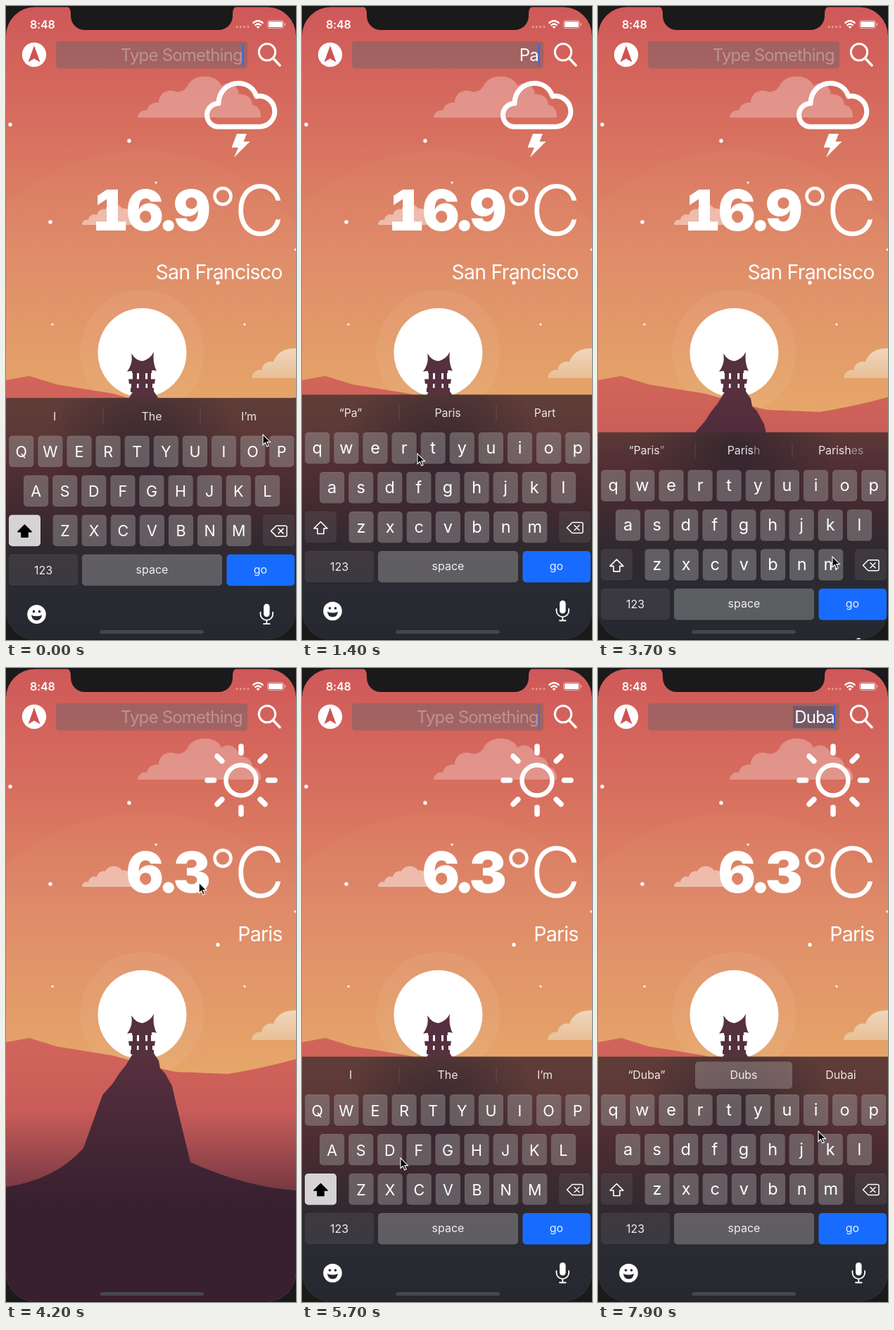
An HTML page for the animation above (8 s loop, 412 by 898 pixels).

```html
<!DOCTYPE html>
<html lang="en">
<head>
<meta charset="utf-8">
<title>Weather search</title>
<style>
  html, body { margin: 0; width: 100%; height: 100%; overflow: hidden; background: #1a1a1a; }
  svg { display: block; width: 100%; height: 100%; font-family: Inter, Roboto, sans-serif; }
  .mid { text-anchor: middle; }
  .end { text-anchor: end; }
  .field { font-size: 24px; letter-spacing: -.8px; }
  #degrees { font: 900 80px Inter, Roboto, sans-serif; font-variant-numeric: tabular-nums; letter-spacing: -3px; }
</style>
</head>
<body>
<svg viewBox="0 0 412 898" preserveAspectRatio="none" fill="#fff">
  <defs>
    <linearGradient id="sky" gradientUnits="userSpaceOnUse" x1="0" y1="0" x2="0" y2="580">
      <stop offset="0" stop-color="#cf5858"/><stop offset=".25" stop-color="#d66b5e"/>
      <stop offset=".6" stop-color="#de8a66"/><stop offset="1" stop-color="#e5a566"/>
    </linearGradient>
    <linearGradient id="hill" gradientUnits="userSpaceOnUse" x1="0" y1="525" x2="0" y2="780">
      <stop offset="0" stop-color="#d2655a"/><stop offset=".4" stop-color="#c95c58"/><stop offset="1" stop-color="#5a2c3c"/>
    </linearGradient>
    <linearGradient id="rock" gradientUnits="userSpaceOnUse" x1="0" y1="540" x2="0" y2="760">
      <stop offset="0" stop-color="#59313f"/><stop offset="1" stop-color="#38202f"/>
    </linearGradient>
    <linearGradient id="haze" gradientUnits="userSpaceOnUse" x1="0" y1="485" x2="0" y2="527">
      <stop offset="0" stop-color="#f0d6bb"/><stop offset="1" stop-color="#e8bf96"/>
    </linearGradient>
    <linearGradient id="glass" gradientUnits="userSpaceOnUse" x1="0" y1="551" x2="0" y2="898">
      <stop offset="0" stop-color="#5f3d37"/><stop offset=".15" stop-color="#5c3937"/>
      <stop offset=".3" stop-color="#512e34"/><stop offset=".45" stop-color="#432a31"/>
      <stop offset=".62" stop-color="#312930"/><stop offset=".8" stop-color="#292a32"/><stop offset="1" stop-color="#26282f"/>
    </linearGradient>
    <radialGradient id="shade" gradientUnits="userSpaceOnUse" cx="198" cy="635" r="140">
      <stop offset="0" stop-color="#2a222c" stop-opacity=".75"/><stop offset="1" stop-color="#2a222c" stop-opacity="0"/>
    </radialGradient>
    <clipPath id="screen"><rect y="1.500" width="412" height="895.500" rx="41"/></clipPath>
  </defs>

  <rect width="412" height="898" fill="#1a1a1a"/>
  <g clip-path="url(#screen)">
    <rect width="412" height="898" fill="url(#sky)"/>
    <circle cx="193.500" cy="490" r="285" fill-opacity=".02"/>
    <circle cx="193.500" cy="490" r="88" fill-opacity=".05"/>
    <path fill-opacity=".28" d="M187 158C187 150 196 147 200 148C202 138 212 136 217 137C217 122 232 116 243 122C252 121 256 117 258 113C266 95 300 96 306 113C316 105 330 112 331 125C345 124 350 134 350 140C360 142 362 150 362 158Z"/>
    <path fill-opacity=".45" d="M108 310C108 304 113 302 117 303C118 296 124 294 129 296C131 288 137 287 141 288C146 278 160 279 165 287C175 285 180 293 184 298C190 300 196 304 196 310Z"/>
    <path fill="url(#haze)" d="M349 527C350 518 358 514 363 516C364 506 374 502 380 504C384 490 398 484 412 485V527Z"/>
    <g id="stars"></g>
    <circle cx="193.500" cy="491" r="63"/>
    <path fill="url(#hill)" d="M0 530L33 524L72 536L152 549Q205 564 240 572L315 575Q360 568 412 554V898H0Z"/>
    <path fill="url(#rock)" d="M176 553L182 543H208L217 556L219 567L226 574L232 585L236 592L240 610L262 700Q340 735 412 740V898H0V735Q70 725 110 680L137 605L152 588L161 574L170 563Z"/>
    <g fill="#55303f">
      <path d="M178 492Q185 503 194 503Q205 500 210 490Q208 506 214 517Q206 514 193 521Q180 515 172 518Q181 506 178 492Z"/>
      <path d="M179 515h28v5h-28zM180 518h6v12h-6zM189 518h9v12h-9zM201 518h5v12h-5zM174 528.500h38l-1 6.500h-36zM178 534h8v10h-8zM188.500 534h10v10h-10zM201 534h7v10h-7zM177 541h33v6h-33z"/>
    </g>

    <text x="34" y="31.500" font-size="16" font-weight="600" letter-spacing="-.2">8:48</text>
    <path d="M328 29.500h18" stroke="#fff" stroke-opacity=".4" stroke-width="3" stroke-linecap="round" stroke-dasharray="0 5.300" fill="none"/>
    <path d="M350.500 24.500Q358 17.500 365.500 24.500M353.500 27.500Q358 23.500 362.500 27.500" fill="none" stroke="#fff" stroke-width="2.300"/>
    <path d="M355.500 29.500Q358 27.500 360.500 29.500L358 32Z"/>
    <rect x="371.500" y="20.500" width="23" height="11" rx="3" fill="none" stroke="#fff" stroke-opacity=".5"/>
    <rect x="373" y="22" width="20" height="8" rx="1.500"/>
    <path d="M396 24q2 2 0 4z"/>

    <circle cx="40" cy="69" r="17.200"/>
    <path fill="#cd5354" d="M40 56L48.500 79.500L40 74.500L31.500 79.500Z"/>
    <rect x="71" y="50" width="272" height="38.500" rx="4.500" fill="#766468" fill-opacity=".52"/>
    <path d="M379.500 74L389 84" stroke="#fff" stroke-width="3.500" stroke-linecap="round"/>
    <circle cx="371" cy="65.300" r="11.700" fill="none" stroke="#fff" stroke-width="3"/>
    <rect id="selection" x="277" y="54" width="60" height="31" fill="#46506e" fill-opacity=".5"/>
    <text id="placeholder" class="field end" x="336" y="78" fill="#ebebf5" fill-opacity=".36">Type Something</text>
    <text id="query" class="field end" x="336" y="78"></text>
    <rect id="caret" x="335.500" y="53" width="2.200" height="32" rx="1" fill="#2b6cf0"/>

    <g id="storm">
      <path fill="none" stroke="#fff" stroke-width="7" stroke-linejoin="round" d="M302 171A16.500 16.500 0 0 1 302 138C302 121 315 109.500 330 109.500C343 109.500 352 117 356 128A21.700 21.700 0 1 1 361 171Z"/>
      <path d="M328 181H342L337.500 192H346.500L324 214.500L330 200.500H320.500Z"/>
    </g>
    <g id="sun" stroke="#fff" stroke-width="7.500" stroke-linecap="round" fill="none" transform="translate(334 159)"></g>
    <text id="degrees" class="end" x="287" y="318"></text>
    <circle cx="308" cy="269.500" r="11.500" fill="none" stroke="#fff" stroke-width="4.600"/>
    <text class="end" x="396" y="325" font-size="99" font-weight="300">C</text>
    <text id="city" class="end" x="392.500" y="387" font-size="28.500" letter-spacing="-.8"></text>

    <rect class="panel" width="412" height="400" fill="url(#glass)"/>
    <rect class="panel" width="412" height="400" fill="url(#shade)"/>
    <g id="keyboard"></g>
    <rect x="133.500" y="884" width="147.500" height="5" rx="2.500" fill="#48474d"/>
  </g>
  <path fill="#1a1a1a" d="M84 0Q92 1 92 10V14A20 20 0 0 0 112 34H302A20 20 0 0 0 322 14V10Q322 1 330 0Z"/>
  <path id="pointer" d="M0 0V14.500L3.400 11.500L5.800 17L8.200 16L5.900 10.600H10.500Z" fill="#000" stroke="#fff" stroke-width="1.100"/>
</svg>
<script>
const LOOP = 8000, STEP = 100, HIDDEN = 347;
const el = id => document.getElementById(id);
const show = (node, on) => node.setAttribute('display', on ? 'inline' : 'none');
const clamp = v => Math.max(0, Math.min(1, v));
const panels = document.querySelectorAll('.panel');

el('stars').innerHTML = [[6, 168], [175, 191], [63, 306], [301, 392], [213, 250, 1.6], [66, 451, 1.6], [339, 451, 1.6], [411, 345, 1.6]]
  .map(([x, y, r = 2.7]) => `<circle cx="${x}" cy="${y}" r="${r}"/>`).join('');
el('sun').innerHTML = '<circle r="21.500" stroke-width="6.500"/>' +
  Array.from({ length: 8 }, (_, i) => `<path d="M0-38.500V-48" transform="rotate(${i * 45})"/>`).join('');

// Keyboard, laid out in its resting position
const key = (x, y, w, opacity, id = '') =>
  `<rect x="${x}" y="${y + 1}" width="${w}" height="44.500" rx="5" fill="#000" fill-opacity=".2"/>
   <rect ${id} x="${x}" y="${y}" width="${w}" height="44.500" rx="5" fill-opacity="${opacity}"/>`;
const label = (x, y, size, text) => `<text class="mid" x="${x}" y="${y}" font-size="${size}">${text}</text>`;

const rows = [['qwertyuiop', 4.2, 604], ['asdfghjkl', 25, 660], ['zxcvbnm', 66.5, 716]];
let board = '', lower = '', upper = '';
for (const [letters, left, y] of rows) {
  [...letters].forEach((c, i) => {
    const x = left + i * 41.1;
    board += key(x, y, 35.2, .27);
    lower += label(x + 17.6, y + 29.5, 23.5, c);
    upper += label(x + 17.6, y + 30.5, 21.5, c.toUpperCase());
  });
}
el('keyboard').innerHTML = `
  <rect id="choice" x="138" y="557.500" width="138" height="38.500" rx="5" fill-opacity=".22"/>
  <path id="dividers" d="M138 565v22M276 565v22" stroke="#fff" stroke-opacity=".13"/>
  <g font-size="16" fill-opacity=".87" class="mid" letter-spacing="-.1">
    <text id="word0" x="69" y="582"></text><text id="word1" x="207" y="582"></text><text id="word2" x="345" y="582"></text>
  </g>
  ${board}<g id="lower">${lower}</g><g id="upper">${upper}</g>
  ${key(4, 716, 45, .11, 'id="shift"')}${key(365, 716, 45, .11)}
  <path id="arrow" d="M26.500 730.500L36 740H31V747.500H22V740H17Z" stroke-width="1.600" stroke-linejoin="round"/>
  <g fill="none" stroke="#fff" stroke-width="1.500" stroke-linejoin="round" stroke-linecap="round">
    <path d="M376.500 739L384 731.500H397Q399 731.500 399 733.500V744.500Q399 746.500 397 746.500H384Z"/>
    <path d="M387 735.500l7 7M394 735.500l-7 7"/>
  </g>
  ${key(4, 772, 98, .11)}${key(108, 772, 199, .27)}
  <rect x="313.500" y="772" width="96.500" height="44.500" rx="5" fill="#176cff"/>
  <g fill-opacity=".9">${label(53, 800, 16, '123')}${label(207.5, 799, 16, 'space')}${label(361.5, 799, 16, 'go')}</g>
  <circle cx="43.500" cy="857" r="13.300"/>
  <g fill="#26282f"><circle cx="39.500" cy="853" r="1.800"/><circle cx="47.500" cy="853" r="1.800"/><path d="M36 858Q43.500 861 51 858Q50 865.500 43.500 865.500T36 858Z"/></g>
  <rect x="366" y="842" width="8.600" height="18.500" rx="4.300"/>
  <path d="M361.500 854v2.500a8.800 8.800 0 0 0 17.600 0v-2.500M370.300 865.500v5M366 870.500h8.600" fill="none" stroke="#fff" stroke-width="1.800" stroke-linecap="round"/>`;

// time, query, suggestions; text after | is drawn faintly
const typing = [
  [0, '', 'I', 'The', 'I’m'],
  [350, 'P', '“P”', 'Please', 'Part'],
  [1000, 'Pa', '“Pa”', 'Paris', 'Part'],
  [1500, 'Par', '“Par”', 'Paris', 'Part'],
  [2050, 'Pari', '“Pari”', 'Paris', 'Paris|h'],
  [2800, 'Paris', '“Paris|”', 'Paris|h', 'Parish|es'],
  [3650, '', '“Paris|”', 'Paris|h', 'Parish|es'],
  [4700, '', 'I', 'The', 'I’m'],
  [5850, 'D', '“D”', 'Do', 'Did'],
  [6400, 'Du', '“Du”', 'Due', 'Dubai'],
  [6950, 'Dub', '“Dub”', 'Dubai', 'Dubs'],
  [7500, 'Duba', '“Duba”', 'Dubs', 'Dubai']
];
const path = [
  [0, 365, 607], [300, 388, 630], [400, 388, 630], [950, 42, 684], [1050, 42, 684], [1400, 164, 634],
  [1550, 156, 632], [1950, 308, 632], [2100, 308, 632], [2500, 72, 649], [2700, 80, 676], [2850, 82, 678],
  [3450, 352, 800], [3600, 352, 800], [3700, 333, 780], [4500, 247, 84], [4900, 246, 84], [5000, 246, 84],
  [5700, 140, 694], [5900, 128, 688], [6300, 226, 632], [6450, 226, 632], [6850, 248, 740], [7000, 248, 740],
  [7400, 43, 684], [7520, 43, 684], [7900, 313, 656], [8000, 311, 638]
];

// Critically damped spring, from 1 to 0
const spring = ms => { const s = Math.max(0, ms) * .01826; return (1 + s) * Math.exp(-s); };

function keyboardOffset(t) {
  if (t < 3662) return HIDDEN * spring(t + 345);
  if (t < 4710) return HIDDEN * (1 - spring(t - 3662));
  return HIDDEN * spring(t - 4710);
}

function pointerAt(t) {
  const i = Math.max(1, path.findIndex(p => p[0] > t));
  const [t0, x0, y0] = path[i - 1], [t1, x1, y1] = path[i];
  const u = (t - t0) / (t1 - t0), e = u * u * (3 - 2 * u);
  return [x0 + (x1 - x0) * e, y0 + (y1 - y0) * e];
}

function caretOpacity(t, since) {
  if (t >= 3650 && t < 4750) return 0;
  const p = (t - since) % 1000;
  return p < 700 ? clamp((700 - p) / 100) : clamp((p - 880) / 120);
}

function draw(t) {
  const [since, query, ...words] = typing.findLast(s => s[0] <= t);
  const caps = t < 350 || (t >= 4700 && t < 5850);
  const paris = t >= 4200, picked = t >= 7700;

  el('query').textContent = query;
  show(el('placeholder'), !query);
  show(el('selection'), picked);
  el('caret').setAttribute('opacity', caretOpacity(t, since === 4700 ? 4750 : since));

  show(el('storm'), !paris);
  show(el('sun'), paris);
  el('degrees').textContent = paris ? '6.3' : '16.9';
  el('city').textContent = paris ? 'Paris' : 'San Francisco';

  const dy = keyboardOffset(t);
  panels.forEach(panel => panel.setAttribute('y', 550.5 + dy));
  el('keyboard').setAttribute('transform', `translate(0 ${dy})`);
  words.forEach((word, i) => {
    const [head, tail = ''] = word.split('|');
    el('word' + i).innerHTML = `${head}<tspan fill-opacity=".45">${tail}</tspan>`;
  });
  show(el('choice'), picked);
  show(el('dividers'), !picked);
  show(el('upper'), caps);
  show(el('lower'), !caps);
  el('shift').setAttribute('fill-opacity', caps ? .8 : .11);
  el('arrow').setAttribute('fill', caps ? '#000' : 'none');
  el('arrow').setAttribute('stroke', caps ? '#000' : '#fff');

  el('pointer').setAttribute('transform', `translate(${pointerAt(t)})`);
}

const start = performance.now();
function tick() {
  const t = (performance.now() - start) % LOOP;
  draw(Math.floor(t / STEP) * STEP);
  requestAnimationFrame(tick);
}
tick();
</script>
</body>
</html>
```
